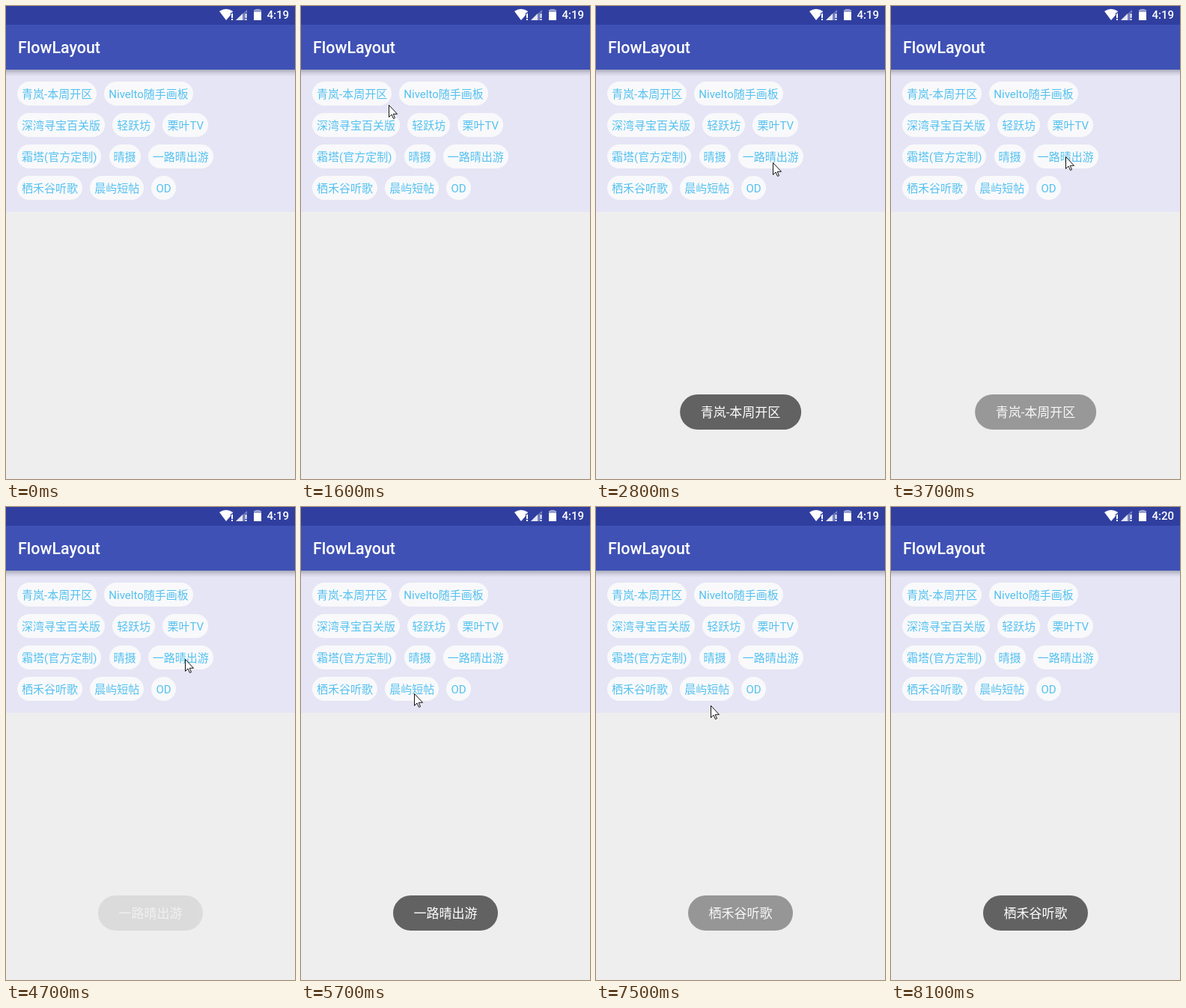
Animation, 386 px wide and 632 px high, one loop 9.2 s. Source, as an HTML page:

```html
<!DOCTYPE html>
<html lang="zh-CN">
<head>
<meta charset="utf-8">
<title>FlowLayout</title>
<style>
  html, body { margin: 0; width: 100%; height: 100%; overflow: hidden; }
  body {
    position: relative;
    background: #eee;
    font-family: Roboto, "Noto Sans CJK SC", "Noto Sans CJK", sans-serif;
  }
  .status, .bar, .shadow, .flow, .toast, .cursor, .icons { position: absolute; }
  .status { left: 0; right: 0; top: 0; height: 25px; background: #303f9f; }
  .icons { left: 280px; top: 0; }
  .clock {
    position: absolute; left: 348.5px; top: 0;
    font-size: 15px; font-weight: 500; line-height: 25px; color: #fff;
  }
  .bar {
    left: 0; right: 0; top: 25px; height: 60px;
    padding-left: 16px; background: #3f51b5;
    font-size: 21.44px; font-weight: 500; line-height: 62px; color: #fff;
  }
  .shadow {
    left: 0; right: 0; top: 85px; height: 9px;
    background: linear-gradient(rgba(70, 70, 90, .38), rgba(70, 70, 90, .14) 50%, rgba(70, 70, 90, 0));
  }
  .flow {
    left: 0; right: 0; top: 85px; height: 190px;
    box-sizing: border-box; padding: 16px 60px 0 15px;
    display: flex; flex-wrap: wrap; align-content: flex-start; gap: 10px 10.2px;
    background: #e6e5f5;
  }
  .tag {
    height: 32px; padding: 0 6px; border-radius: 16px;
    background: #f9f9fb; color: #54c1f0;
    font-size: 15px; line-height: 34px; white-space: nowrap;
  }
  .toast {
    left: 193px; top: 519px; height: 47px; padding: 0 27.5px;
    transform: translateX(-50%); border-radius: 24px;
    background: #626262; color: #fff; opacity: 0;
    font-size: 17px; line-height: 49px; white-space: nowrap;
  }
  .cursor { left: 0; top: 0; overflow: visible; visibility: hidden; }
</style>
</head>
<body>
<div class="flow"></div>
<div class="shadow"></div>
<div class="bar">FlowLayout</div>
<div class="status">
  <svg class="icons" width="66" height="25" fill="#fff">
    <path d="M5 7Q14 1 23 7L22 9H20V12L14 19Z"/>
    <path id="alert" d="M21 10h2v6h-2zM21 17h2v2h-2z"/>
    <path d="M27 19L42 5V9H39V19Z" opacity=".35"/>
    <path d="M27 19L36 10V19Z" opacity=".8"/>
    <use href="#alert" x="18.5"/>
    <path d="M53 4h6V5H61V8H51V5h2z" opacity=".5"/>
    <path d="M51 8h10v11H51z"/>
  </svg>
  <span class="clock">4:19</span>
</div>
<div class="toast"></div>
<svg class="cursor" width="12" height="19">
  <path d="M.5.5V16.5L4 13L6.5 18.5L8.5 17.6L6.2 12.3H11.5Z" fill="#fff" stroke="#111"/>
</svg>
<script>
  const LOOP = 9200, STEP = 100, MINUTE = 7900;
  const TOAST_LIFE = 2250, FADE_IN = 400, FADE_OUT = 330;

  const tags = ['青岚-本周开区', 'Nivelto随手画板', '深湾寻宝百关版', '轻跃坊', '栗叶TV',
    '霜塔(官方定制)', '晴摄', '一路晴出游', '栖禾谷听歌', '晨屿短帖', 'OD'];

  const toasts = [
    { start: 1650, text: '青岚-本周开区' },
    { start: 4650, text: '一路晴出游' },
    { start: 7250, text: '栖禾谷听歌' }
  ];

  // The pointer rests between moves; lift bends a move upwards.
  const entry = { x: 360, y: 232 };
  const moves = [
    { from: 200, to: 1100, x: 61, y: 103 },
    { from: 1300, to: 1600, x: 117, y: 132, lift: 28 },
    { from: 1600, to: 2800, x: 236, y: 209 },
    { from: 2900, to: 3100, x: 229, y: 200 },
    { from: 3300, to: 4400, x: 241, y: 202 },
    { from: 4600, to: 5700, x: 151, y: 249 },
    { from: 5700, to: 6800, x: 77, y: 238, lift: 25 },
    { from: 7200, to: 8100, x: 380, y: 345 }
  ];

  const $ = s => document.querySelector(s);
  const flow = $('.flow'), toast = $('.toast'), cursor = $('.cursor'), clock = $('.clock');

  for (const name of tags) {
    const tag = document.createElement('span');
    tag.className = 'tag';
    tag.textContent = name;
    flow.append(tag);
  }

  const clamp = v => Math.min(1, Math.max(0, v));
  const ease = k => (1 - Math.cos(Math.PI * k)) / 2;

  function pointAt(t) {
    let { x, y } = entry;
    for (const m of moves) {
      const k = clamp((t - m.from) / (m.to - m.from));
      x += (m.x - x) * ease(k);
      y += (m.y - y) * ease(k) - (m.lift || 0) * Math.sin(Math.PI * k);
    }
    return [Math.round(x), Math.round(y)];
  }

  function draw(t) {
    const [x, y] = pointAt(t);
    cursor.style.transform = `translate(${x}px, ${y}px)`;
    const shown = t >= moves[0].from && t < moves[moves.length - 1].to;
    cursor.style.visibility = shown ? 'visible' : 'hidden';

    const live = toasts.find(({ start }) => t > start && t < start + TOAST_LIFE);
    const age = live ? t - live.start : 0;
    if (live) toast.textContent = live.text;
    toast.style.opacity = clamp(Math.min(age / FADE_IN, (TOAST_LIFE - age) / FADE_OUT));

    clock.textContent = t < MINUTE ? '4:19' : '4:20';
  }

  const begin = performance.now();
  function tick() {
    const t = (performance.now() - begin) % LOOP;
    draw(Math.floor(t / STEP) * STEP);
    requestAnimationFrame(tick);
  }
  tick();
</script>
</body>
</html>
```
